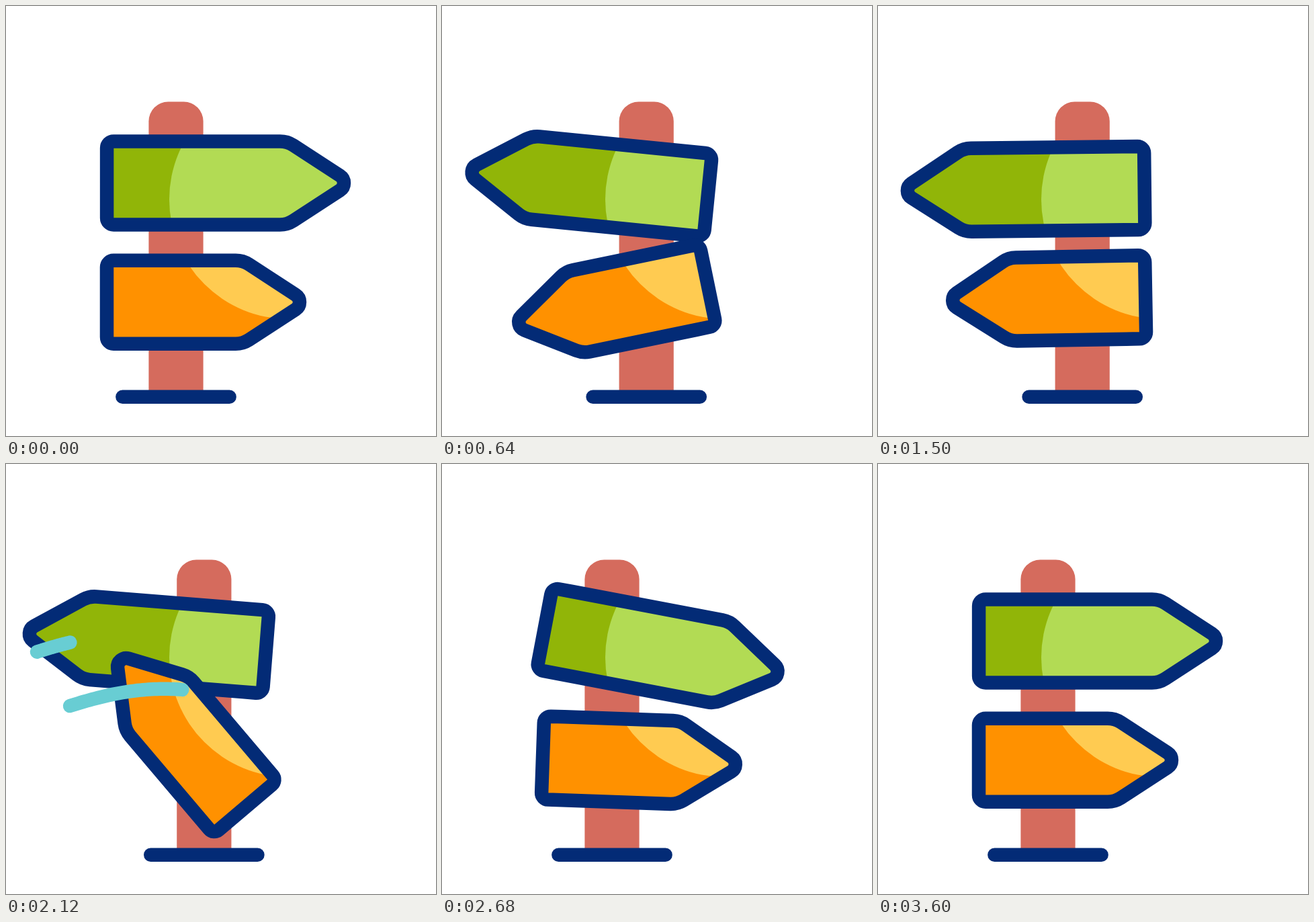
An HTML page with a canvas for the animation above (3.62 s loop, 640 by 640 pixels).

```html
<!DOCTYPE html>
<html lang="en">
<head>
<meta charset="utf-8">
<title>Signpost in the wind</title>
<style>
  html, body { margin: 0; height: 100%; overflow: hidden; background: #fff; }
  canvas { display: block; }
</style>
</head>
<body>
<canvas id="stage" width="640" height="640"></canvas>
<script>
const ctx = document.getElementById('stage').getContext('2d');
const LOOP = 3620, RETURN = 1940, LINE = 20.5;
const NAVY = '#032b76', POST = '#d56b5d', WIND = '#68cdd3';

// Keyframes as [time, value], with a sine ease between neighbours.
const postShift = [[90, 0], [410, 51.2], [2030, 51.2], [2350, 0]];

const signs = [
  { x: 247.8, y: 267.7, left: -97.7, mid: -4.3, tip: 266, dark: '#91b508', light: '#b2db54',
    turn: [[116, 0], [766, -191.5], [1100, -172], [1320, -183], [1580, -180],
           [2056, -180], [2706, 11.5], [3040, -15.2], [3330, 8], [3560, 0]] },
  { x: 248.5, y: 437.8, left: -98.5, mid: 2.9, tip: 199.3, dark: '#ff9100', light: '#ffcb51',
    turn: [[0, 0], [535, -196], [920, -170.8], [1300, -188], [1560, -180],
           [1940, -180], [2475, 15.5], [2860, -9], [3240, 8], [3500, 0]] }
];

const gusts = [
  { from: 46, to: 564, crestX: 187, crestY: 254, start: 120 },
  { from: 94, to: 470, crestX: 235, crestY: 334.8, start: 40 }
];

const ease = u => (1 - Math.cos(Math.PI * Math.min(1, Math.max(0, u)))) / 2;

function valueAt(keys, t) {
  const i = keys.findIndex(key => key[0] > t);
  if (i === 0) return keys[0][1];
  if (i < 0) return keys[keys.length - 1][1];
  const [t0, a] = keys[i - 1], [t1, b] = keys[i];
  return a + (b - a) * ease((t - t0) / (t1 - t0));
}

function signPath({ left, mid, tip }) {
  const half = 62, top = mid - half, bottom = mid + half, shoulder = tip - 95.2;
  ctx.beginPath();
  ctx.moveTo(left + 30, top);
  ctx.arcTo(shoulder, top, tip, mid, 36);
  ctx.arcTo(tip, mid, shoulder, bottom, 13);
  ctx.arcTo(shoulder, bottom, left, bottom, 36);
  ctx.arcTo(left, bottom, left, top, 10);
  ctx.arcTo(left, top, shoulder, top, 10);
  ctx.closePath();
}

function drawSign(sign, shift, t) {
  ctx.save();
  ctx.translate(sign.x + shift, sign.y);
  ctx.rotate(valueAt(sign.turn, t) * Math.PI / 180);
  signPath(sign);
  ctx.fillStyle = sign.dark;
  ctx.fill();

  // The light spot stays still while the board turns beneath it.
  ctx.save();
  ctx.clip();
  ctx.resetTransform();
  ctx.beginPath();
  ctx.arc(421, 288, 178, 0, 2 * Math.PI);
  ctx.fillStyle = sign.light;
  ctx.fill();
  ctx.restore();

  signPath(sign);
  ctx.strokeStyle = NAVY;
  ctx.stroke();
  ctx.restore();
}

function drawPost(shift) {
  ctx.fillStyle = POST;
  ctx.beginPath();
  ctx.roundRect(212.4 + shift, 142.6, 81.2, 439, [29, 29, 0, 0]);
  ctx.fill();
  ctx.strokeStyle = NAVY;
  ctx.beginPath();
  ctx.moveTo(173.4 + shift, 581.7);
  ctx.lineTo(332.6 + shift, 581.7);
  ctx.stroke();
}

function drawGust({ from, to, crestX, crestY, start }, t) {
  const head = ease((t - start) / 300), tail = ease((t - start - 130) / 300);
  if (head <= 0 || tail >= 1) return;
  const steps = 40;
  ctx.beginPath();
  for (let i = 0; i <= steps; i++) {
    const x = from + (to - from) * (tail + (head - tail) * i / steps);
    ctx.lineTo(x, crestY + 42 * (1 - Math.cos((x - crestX) * 0.0083)));
  }
  ctx.strokeStyle = WIND;
  ctx.stroke();
}

function drawWind(t) {
  ctx.save();
  if (t < RETURN) ctx.transform(-1, 0, 0, 1, 651.5, 0);
  for (const gust of gusts) drawGust(gust, t % RETURN);
  ctx.restore();
}

function draw(now) {
  const t = now % LOOP, shift = valueAt(postShift, t);
  ctx.clearRect(0, 0, 640, 640);
  ctx.lineWidth = LINE;
  ctx.lineCap = ctx.lineJoin = 'round';
  drawPost(shift);
  for (const sign of signs) drawSign(sign, shift, t);
  drawWind(t);
}

let begin;
function tick(now) {
  begin ??= now;
  draw(now - begin);
  requestAnimationFrame(tick);
}
draw(0);
requestAnimationFrame(tick);
</script>
</body>
</html>
```
